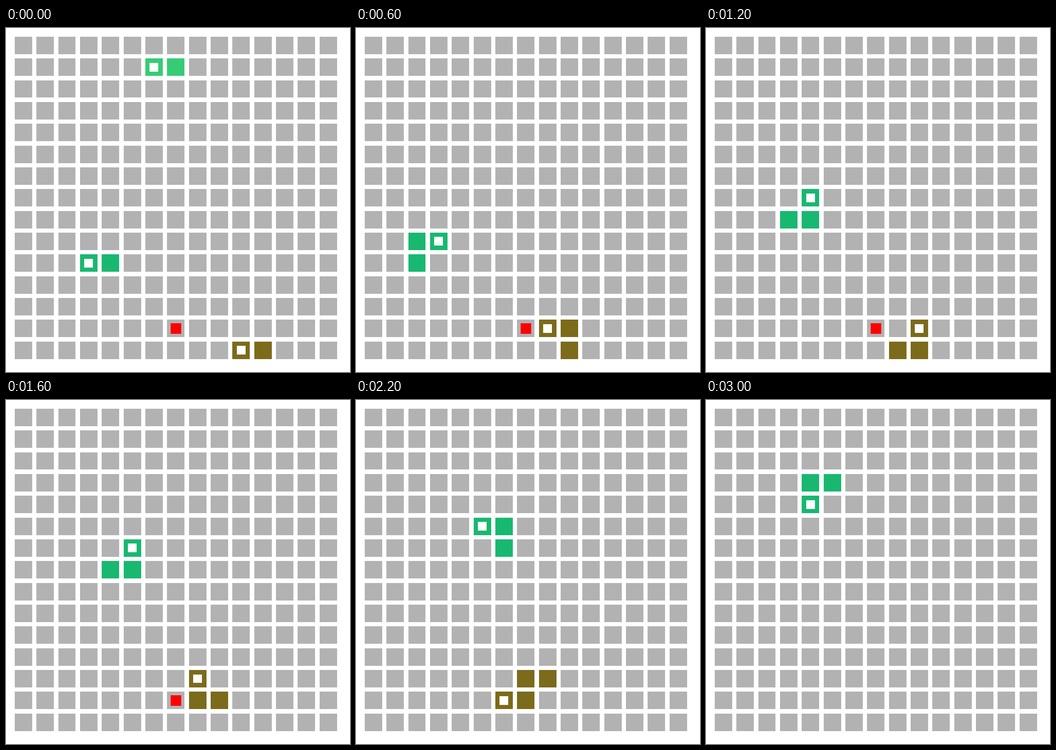
Recreate the animation shown at these times as an HTML page with a canvas. Size 748 by 748 pixels, loop 3.2 s.

```html
<!DOCTYPE html>
<html lang="en">
<head>
<meta charset="utf-8">
<title>Grid snakes</title>
<style>
html, body { margin: 0; width: 100%; height: 100%; overflow: hidden; background: #fff; }
canvas { display: block; width: 748px; height: 748px; }
</style>
</head>
<body>
<canvas id="stage" width="748" height="748"></canvas>
<script>
const ctx = document.getElementById("stage").getContext("2d");
const STAGE = 748, COUNT = 15, STEP_MS = 200, STEPS = 16;
const PITCH = STAGE / (COUNT + 0.8);
const CELL = PITCH * 0.8;
const DIRS = { L: [-1, 0], R: [1, 0], U: [0, -1], D: [0, 1] };

const food = { x: 7, y: 13, eatenAt: 10 };

// Each path starts at the tail; a snake dies when its moves run out.
const snakes = [
  { color: "#18b870", path: walk(4, 10, "LLURURURURULUULD") },
  { color: "#35cc75", path: walk(7, 1, "LU") },
  { color: "#7b6b1a", path: walk(11, 14, "LLULDRULULDLLDR"), growsAt: food.eatenAt + 1 }
];

function walk(x, y, moves) {
  const path = [[x, y]];
  for (const m of moves) {
    x += DIRS[m][0];
    y += DIRS[m][1];
    path.push([x, y]);
  }
  return path;
}

// Square centred in a cell, with edges snapped to whole pixels.
function square(col, row, scale, color) {
  const size = CELL * scale;
  const start = i => PITCH * (i + 0.4) + (CELL - size) / 2;
  const x = Math.round(start(col)), y = Math.round(start(row));
  ctx.fillStyle = color;
  ctx.fillRect(x, y, Math.round(start(col) + size) - x, Math.round(start(row) + size) - y);
}

function drawSnake({ color, path, growsAt = Infinity }, step) {
  const head = step + 1;
  if (head >= path.length) return;
  const length = step >= growsAt ? 4 : 3;
  const body = path.slice(Math.max(0, head - length + 1), head + 1);
  for (const [x, y] of body) square(x, y, 1, color);
  square(...path[head], 0.5, "#fff");
}

function draw(step) {
  ctx.fillStyle = "#fff";
  ctx.fillRect(0, 0, STAGE, STAGE);
  for (let row = 0; row < COUNT; row++) {
    for (let col = 0; col < COUNT; col++) square(col, row, 1, "#b2b2b2");
  }
  if (step < food.eatenAt) square(food.x, food.y, 0.6, "#f00");
  for (const snake of snakes) drawSnake(snake, step);
}

const begin = performance.now();
function tick() {
  const time = Math.max(0, performance.now() - begin);
  draw(Math.floor(time / STEP_MS) % STEPS);
  requestAnimationFrame(tick);
}
tick();
</script>
</body>
</html>
```
